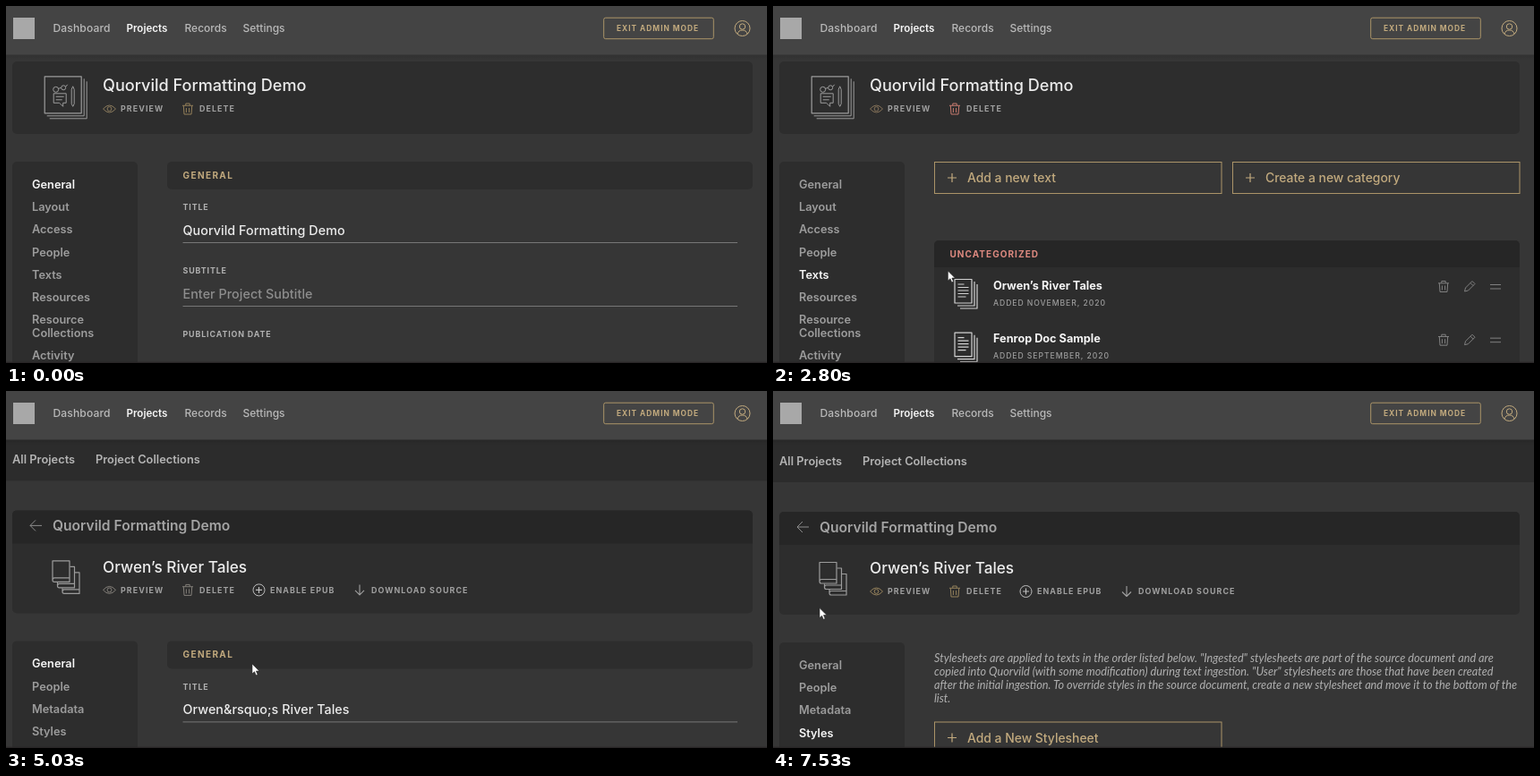
Write an HTML page that moves like this. It is 850 px wide and 399 px high and loops after 8 s.

```html
<!DOCTYPE html>
<html lang="en">
<head>
<meta charset="utf-8">
<title>Admin walkthrough</title>
<style>
html, body { margin: 0; width: 100%; height: 100%; overflow: hidden; background: #363636; }
svg { display: block; width: 850px; height: 399px; font-family: Inter, sans-serif; }
text { white-space: pre; }
.para { font: italic 12.7px Lato, sans-serif; fill: #b0b0b0; }
</style>
</head>
<body>
<svg id="stage" viewBox="0 0 850 399"></svg>
<script>
const LOOP = 8000;
const TAN = '#c2aa7e', EDGE = '#ab9468', WHITE = '#f5f5f5', GREY = '#9c9c9c', LABEL = '#b0b0b0';
const PANEL = '#2d2d2d', DARK = '#262626', BODY = '#363636';
const PROJECT = 'Quorvild Formatting Demo', BOOK = 'Orwen’s River Tales';

// --- drawing helpers; text is placed by the middle of its capitals
const label = (x, y, size, str, fill, weight = 500, gap = 0, id = '') =>
  `<text ${id && `id="${id}"`} x="${x}" y="${y + size * 0.36}" font-size="${size}" font-weight="${weight}" fill="${fill}" letter-spacing="${gap}">${str}</text>`;
const rect = (x, y, w, h, fill, r = 0) =>
  `<rect x="${x}" y="${y}" width="${w}" height="${h}" rx="${r}" fill="${fill}"/>`;
const line = (d, stroke, width = 1, fill = 'none') =>
  `<path d="${d}" fill="${fill}" stroke="${stroke}" stroke-width="${width}" stroke-linejoin="round"/>`;
const at = (x, y, body) => `<g transform="translate(${x} ${y})">${body}</g>`;
const group = (id, body) => `<g id="${id}">${body}</g>`;
const caps = (x, y, str) => label(x, y, 8.9, str, '#a0a0a0', 700, 1.08);

// --- icons, centred on their own origin
const eye = c => line('M-7 0Q0 -8 7 0Q0 8 -7 0Z', c) + `<circle r="2.4" fill="none" stroke="${c}"/>`;
const trash = c => line('M-6 -3.7H6M-2.2 -4V-6H2.2V-4M-4.7 -3.5L-4 6H4L4.7 -3.5M-1.6 -1V4M1.6 -1V4', c);
const pencil = c => line('M-5.5 5.5L-4.5 1.5L3 -6L6 -3L-1.5 4.5ZM1 -4L4 -1', c);
const handle = c => line('M-6 -2H6M-6 2.5H6', c);
const plus = c => line('M-5 0H5M0 -5V5', c, 1.2);

const projectIcon = c =>
  line('M.5 .5H41.5V41.5H.5Z', c, 1.2) +
  line('M44.5 3V44.5H3M47.5 6V47.5H6', c) +
  line('M10.5 19.5H24.5V30H21V34L17 30H10.5ZM13 23H22M13 26.5H20M30.5 31V15L32 11.5L33.5 15V31L32 34Z', c) +
  line('M10 15a3 3 0 1 0 6 0a3 3 0 1 0 -6 0M19 13a2.5 2.5 0 1 0 5 0a2.5 2.5 0 1 0 -5 0M16 14L19 13M24 12L26 9.5', c);
const bookIcon = c => [[11, 13], [5.5, 6.5], [0, 0]].map(([x, y]) =>
  at(x, y, rect(0, 0, 20, 24.5, PANEL) + line('M.5 22V.5H19.5V24H2.5Q.5 24 .5 22Q.5 19.5 2.5 19.5H19.5', c, 1.2))).join('');
const docIcon = c =>
  line('M.5 .5H19.5V27H.5ZM4 6H11M4 9.5H16M4 13H16M4 16.5H16M4 20H13', c, 1.2) +
  line('M22.5 3V30H3.5M25.5 6V33H6.5', c, 1.2);

// --- page parts
function actions(y, eyeColor, trashColor) {
  return at(115.5, y, eye(eyeColor)) + caps(128, y, 'PREVIEW') +
    at(203, y, trash(trashColor)) + caps(216, y, 'DELETE');
}

function projectHead(eyeColor, trashColor) {
  return rect(7, 135, 827, 81, PANEL, 5) + at(42.7, 151.3, projectIcon('#9c9c9c')) +
    label(108, 161, 18.1, PROJECT, '#ececec') + actions(188, eyeColor, trashColor);
}

function bookHead(iconColor) {
  return rect(7, 135, 827, 115, PANEL, 5) +
    `<path d="M7 172V140a5 5 0 0 1 5 -5H829a5 5 0 0 1 5 5V172Z" fill="${DARK}"/>` +
    line('M40 152H27M33 146L27 152L33 158', '#8c8c8c') +
    label(52, 152, 15.6, PROJECT, '#a4a4a4', 600) +
    at(51.5, 191, bookIcon('#9c9c9c')) +
    label(108, 198, 17.2, BOOK, '#ececec') + actions(224, iconColor, iconColor) +
    at(282.5, 224, '<circle r="6.5" fill="none" stroke="#bdbdbd"/>' + line('M-3.5 0H3.5M0 -3.5V3.5', '#bdbdbd', 1.2)) +
    caps(295, 224, 'ENABLE EPUB') +
    line('M395 218V229.5M390 224.5L395 229.5L400 224.5', '#a0a0a0', 1.1) +
    caps(408, 224, 'DOWNLOAD SOURCE');
}

function sidebar(top, height, names, active, hoverId) {
  let y = top + 25.5;
  const rows = names.map(name => {
    const isActive = name === active;
    const id = hoverId && name === hoverId.name ? hoverId.id : '';
    const row = name.split('|').map((part, i) =>
      label(29, y + i * 14.6, 12.75, part, isActive ? WHITE : GREY, 600, 0, id)).join('');
    y += name.includes('|') ? 40 : 25.2;
    return row;
  });
  return rect(7, top, 140, height, PANEL, 5) + rows.join('');
}

function form(top, title, hint) {
  const field = (y, name, value, fill, end) =>
    label(197.5, y, 8.9, name, LABEL, 700, 0.87) +
    label(197.5, y + 25.7, 14.3, value, fill, 500, 0.06) +
    rect(197.5, y + 39, end - 197.5, 1, '#777');
  return rect(180, top, 654, 31, PANEL, 5) +
    label(197.5, top + 15, 10, 'GENERAL', TAN, 700, 1.4) +
    field(top + 51, 'TITLE', title, '#ececec', 817) +
    field(top + 122, 'SUBTITLE', hint, '#8e8e8e', 817) +
    field(top + 193, 'PUBLICATION DATE', '', WHITE, 492);
}

const button = (x, y, str) =>
  `<rect x="${x + 0.5}" y="${y + 0.5}" width="320.5" height="35" fill="none" stroke="${EDGE}"/>` +
  at(x + 20, y + 18, plus(TAN)) + label(x + 37, y + 18, 13.9, str, TAN);

function textList() {
  const row = (y, name, date) =>
    at(202.5, y - 7, docIcon('#d2d2d2')) +
    label(246, y, 12.7, name, WHITE, 700) +
    label(246, y + 19.5, 8.6, 'ADDED ' + date, '#9c9c9c', 500, 0.95) +
    at(749, y + 1.5, trash('#808080')) + at(778, y + 1.5, pencil('#808080')) + at(807, y + 1.5, handle('#808080'));
  return button(180, 247, 'Add a new text') + button(513, 247, 'Create a new category') +
    rect(180, 335, 654, 200, PANEL, 5) +
    `<path d="M180 365V340a5 5 0 0 1 5 -5H829a5 5 0 0 1 5 5V365Z" fill="${DARK}"/>` +
    label(197.5, 350, 10, 'UNCATEGORIZED', '#de8a80', 700, 1.05) +
    row(385, BOOK, 'NOVEMBER, 2020') + row(444.7, 'Fenrop Doc Sample', 'SEPTEMBER, 2020');
}

const intro = [
  'Stylesheets are applied to texts in the order listed below. "Ingested" stylesheets are part of the source document and are',
  'copied into Quorvild (with some modification) during text ingestion. "User" stylesheets are those that have been created',
  'after the initial ingestion. To override styles in the source document, create a new stylesheet and move it to the bottom of the',
  'list.'
].map((s, i) => `<text class="para" x="180" y="${302.5 + i * 15.1}">${s}</text>`).join('');

const projectMenu = ['General', 'Layout', 'Access', 'People', 'Texts', 'Resources', 'Resource|Collections', 'Activity'];
const bookMenu = ['General', 'People', 'Metadata', 'Styles', 'Reingest'];

const subnav = rect(0, 54, 850, 48, '#2c2c2c') +
  label(7, 78, 12.85, 'All Projects', '#b4b4b4', 600) +
  label(100, 78, 12.85, 'Project Collections', '#b4b4b4', 600);

const nav = rect(0, 0, 850, 54.5, '#444') +
  '<rect y="54.5" width="850" height="6" fill="url(#shade)"/>' +
  rect(8, 13, 24, 24, '#a8a8a8') +
  label(52.5, 25, 12.1, 'Dashboard', '#b9b9b9', 500, 0.12) +
  label(134.5, 25, 11.6, 'Projects', WHITE, 600) +
  label(199.5, 25, 12, 'Records', '#b9b9b9') +
  label(264.5, 25, 12, 'Settings', '#b9b9b9') +
  `<rect x="667.7" y="13.2" width="122.6" height="23.5" rx="2" fill="none" stroke="${EDGE}"/>` +
  label(682, 25, 8.4, 'EXIT ADMIN MODE', TAN, 700, 0.98) +
  at(822.5, 25, `<g fill="none" stroke="${TAN}"><circle r="8.5"/><circle cy="-2" r="3.2"/><path d="M-5.5 6.3Q-4.5 2 0 2T5.5 6.3"/></g>`);

const cursors = group('ring', '<circle r="9.5" fill="#b0a70f" opacity=".93"/>') +
  group('arrow', line('M0 0V11L2.6 8.7L4.3 12.8L6.2 12L4.5 8H8Z', '#222', 0.6, '#fff')) +
  group('hand', line('M-1.5 0Q0 -2.4 1.5 0V5.5L6 6.8Q7.7 7.5 7.4 9.5L6.2 16H-.8L-4.7 10Q-4.6 7.8 -2.6 8.8L-1.5 9.8Z', '#222', 0.6, '#fff')) +
  group('beam', line('M-3.5 -6Q0 -6 0 -4Q0 -6 3.5 -6M0 -4.5V4.5M-3.5 6Q0 6 0 4Q0 6 3.5 6M-1.5 2.5H1.5', '#d5d5d5', 1.2));

document.getElementById('stage').innerHTML =
  '<defs><linearGradient id="shade" x2="0" y2="1"><stop stop-opacity=".1"/><stop offset="1" stop-opacity="0"/></linearGradient></defs>' +
  rect(0, 0, 850, 399, BODY) +
  group('page', subnav +
    group('projectGeneral', projectHead('#8a7a5c', '#937f59') +
      sidebar(247, 320, projectMenu, 'General', { name: 'Texts', id: 'textsLink' }) +
      form(247, PROJECT, 'Enter Project Subtitle')) +
    group('projectTexts', projectHead('#857259', '#c67a6e') +
      sidebar(247, 320, projectMenu, 'Texts') + textList()) +
    group('bookGeneral', bookHead('#827e78') +
      sidebar(281, 167, bookMenu, 'General', { name: 'Styles', id: 'stylesLink' }) +
      form(281, 'Orwen&amp;rsquo;s River Tales', 'Enter Subtitle')) +
    group('bookStyles', bookHead('#93805b') +
      sidebar(281, 167, bookMenu, 'Styles') + intro + button(180, 369.5, 'Add a New Stylesheet'))) +
  nav + rect(0, 397.7, 850, 1.3, '#292627') + group('pointer', cursors);

// --- timing
const el = id => document.getElementById(id);
const clamp = v => Math.max(0, Math.min(1, v));
const linear = p => p, easeIn = p => p * p, easeOut = p => p * (2 - p), smooth = p => p * p * (3 - 2 * p);
const ramp = (t, a, b) => smooth(clamp((t - a) / (b - a)));
const within = (t, a, b) => t >= a && t < b;

const track = [
  [500, 318, 381, linear], [1310, 53, 303, smooth], [1540, 51.5, 299.5, easeOut], [2200, 51.5, 299.5, linear],
  [2800, 195, 296, easeIn], [3020, 275, 301, linear], [3490, 294.5, 308.5, easeOut], [4760, 294.5, 308.5, linear],
  [5030, 275, 305, easeIn], [5510, 255, 306, linear], [5580, 209, 300, linear], [6440, 52, 242.5, easeOut]
];

function pointerAt(t) {
  const i = track.findIndex(k => k[0] > t);
  if (i < 1) return track[i ? track.length - 1 : 0].slice(1, 3);
  const [t0, x0, y0] = track[i - 1], [t1, x1, y1, ease] = track[i];
  const p = ease((t - t0) / (t1 - t0));
  return [x0 + (x1 - x0) * p, y0 + (y1 - y0) * p];
}

function scrollAt(t) {
  if (t < 1700) return 73;
  if (t < 4020) return 73 * ramp(t, 2270, 2700);
  if (t < 5580) return 145 * ramp(t, 4990, 5650);
  return t < 7380 ? 145 : 0;
}

function viewAt(t) {
  if (t < 1770) return 'projectGeneral';
  if (t < 4190) return 'projectTexts';
  return t < 7460 ? 'bookGeneral' : 'bookStyles';
}

function shapeAt(t, x, y, scroll) {
  if (within(t, 1270, 2290) || within(t, 2940, 4190) || within(t, 6330, 7530)) return 'hand';
  const overField = [358, 429].some(f => Math.abs(y + scroll - f) < 14);
  return within(t, 4800, 5580) && overField ? 'beam' : 'arrow';
}

const show = (id, on) => el(id).setAttribute('display', on ? 'inline' : 'none');
const move = (id, x, y) => el(id).setAttribute('transform', `translate(${x} ${y})`);
function highlight(id, p) {
  const v = Math.round(156 + 89 * p);
  el(id).setAttribute('fill', `rgb(${v},${v},${v})`);
}

function draw(t) {
  const scroll = scrollAt(t), view = viewAt(t), [x, y] = pointerAt(t);
  const shape = shapeAt(t, x, y, scroll);
  move('page', 0, -scroll);
  move('pointer', x, y);
  for (const id of ['projectGeneral', 'projectTexts', 'bookGeneral', 'bookStyles']) show(id, id === view);
  for (const id of ['arrow', 'hand', 'beam']) show(id, id === shape);
  show('pointer', t >= 520);
  show('ring', within(t, 1450, 1535) || within(t, 3705, 4020) || within(t, 7065, 7380));
  highlight('textsLink', ramp(t, 1250, 1400));
  highlight('stylesLink', ramp(t, 6350, 6510));
}

function tick() {
  draw(performance.now() % LOOP);
  requestAnimationFrame(tick);
}
tick();
</script>
</body>
</html>
```
